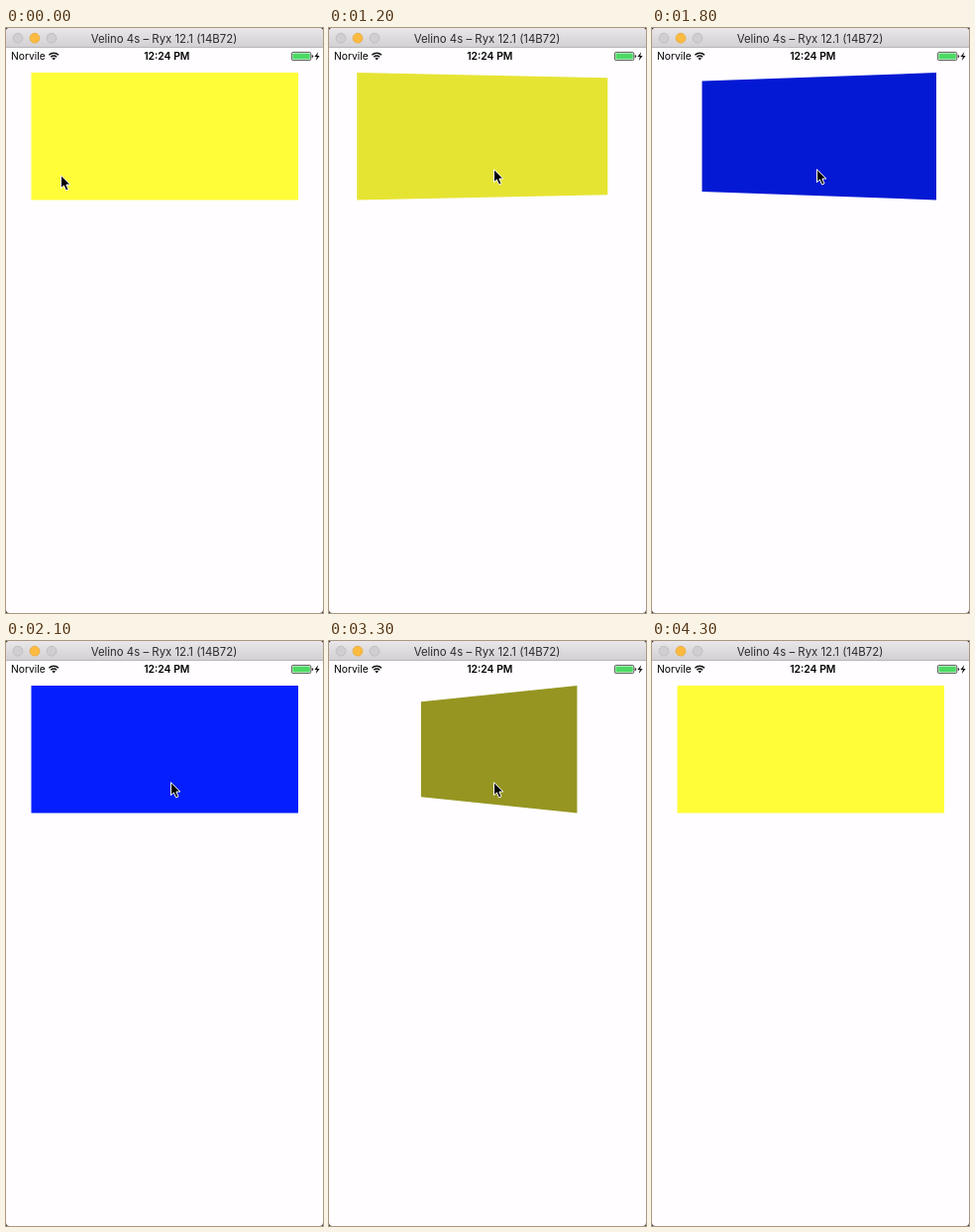
Animation of 320x590 px, one loop 4500 ms. Source, as an HTML page:

```html
<!DOCTYPE html>
<html lang="en">
<head>
<meta charset="utf-8">
<title>Card flip</title>
<style>
  html, body { margin: 0; width: 100%; height: 100%; overflow: hidden; background: #333; }
  svg { display: block; width: 320px; height: 590px; }
  text { font-family: Inter, Roboto, sans-serif; }
</style>
</head>
<body>
<svg viewBox="0 0 320 590">
  <defs>
    <linearGradient id="bar" x2="0" y2="1">
      <stop offset="0" stop-color="#e9e7e9"/>
      <stop offset="1" stop-color="#d1cfd1"/>
    </linearGradient>
    <clipPath id="window"><rect width="320" height="590" rx="3.5"/></clipPath>
  </defs>

  <g clip-path="url(#window)">
    <rect width="320" height="590" fill="#fffdff"/>
    <rect width="320" height="20" fill="url(#bar)"/>
    <rect y="19" width="320" height="1" fill="#b9b7b9"/>
    <g stroke-width=".8">
      <circle cx="12" cy="10.2" r="4.9" fill="#d0ced0" stroke="#bbb9bb"/>
      <circle cx="29" cy="10.2" r="4.9" fill="#fcbb40" stroke="#e8aa3c"/>
      <circle cx="46" cy="10.2" r="4.9" fill="#d0ced0" stroke="#bbb9bb"/>
    </g>
    <text x="159.5" y="14.5" font-size="11.4" text-anchor="middle" fill="#2c2b2c">Velino 4s – Ryx 12.1 (14B72)</text>

    <text x="5" y="32.2" font-size="10.3" fill="#000">Norvile</text>
    <g fill="none" stroke="#111" stroke-width="1.5">
      <path d="M43.4 27.2a6.8 6.8 0 0 1 9.6 0"/>
      <path d="M45.3 29.3a4.1 4.1 0 0 1 5.8 0"/>
    </g>
    <path d="M46.5 30.6a2.4 2.4 0 0 1 3.4 0l-1.7 1.8z" fill="#111"/>
    <text x="162.3" y="32.2" font-size="10.4" font-weight="600" text-anchor="middle" fill="#000">12:24 PM</text>
    <rect x="288.4" y="24.4" width="19.4" height="8.2" rx="1.5" fill="#fff" stroke="#333" stroke-width=".8"/>
    <rect x="289.4" y="25.4" width="17.4" height="6.2" rx=".7" fill="#4cd964"/>
    <path d="M308.7 27a1.5 1.5 0 0 1 0 3z" fill="#333"/>
    <path d="M315.2 24.3l-3.8 4.8h2.4l-1 3.8 3.8-4.9h-2.4z" fill="#111"/>

    <polygon id="card"/>
    <path id="cursor" d="M0 0V13L2.9 10.3 5.1 15.3 7.5 14.3 5.4 9.4H9.3Z"
          fill="#000" stroke="#fff" stroke-width="1" stroke-linejoin="round"/>
  </g>
</svg>
<script>
  const LOOP = 4500, TICK = 100, FLIP = 1015;
  const FLIP_OUT = 1020, FLIP_BACK = 2648;
  const YELLOW = [255, 253, 56], BLUE = [5, 30, 254];
  const CX = 160.25, CY = 109.25, HALF_W = 134.75, HALF_H = 64.25, DEPTH = 592;

  const card = document.getElementById('card');
  const cursor = document.getElementById('cursor');

  const clamp = v => Math.min(1, Math.max(0, v));
  const mix = (a, b, p) => a + (b - a) * p;
  const smooth = p => p * p * (3 - 2 * p);

  // cubic-bezier(.42, 0, .58, 1)
  function easeInOut(x) {
    let lo = 0, hi = 1;
    for (let i = 0; i < 24; i++) {
      const s = (lo + hi) / 2, r = 1 - s;
      if (1.26 * r * r * s + 1.74 * r * s * s + s * s * s < x) lo = s;
      else hi = s;
    }
    return smooth(lo);
  }

  // The near edge stays in the screen plane while the far edge recedes.
  function drawCard(t) {
    const back = t >= FLIP_BACK;
    const turn = easeInOut(clamp((t - (back ? FLIP_BACK : FLIP_OUT)) / FLIP));
    const angle = turn * Math.PI;
    const scale = DEPTH / (DEPTH + 2 * HALF_W * Math.sin(angle));
    const w = HALF_W * Math.cos(angle);
    const near = CX - w, far = CX + w * scale, h = HALF_H * scale;
    card.setAttribute('points',
      `${near},${CY - HALF_H} ${far},${CY - h} ${far},${CY + h} ${near},${CY + HALF_H}`);

    const face = (turn < 0.5) !== back ? YELLOW : BLUE;
    const light = 1 - 1.54 * Math.min(turn, 1 - turn);
    card.setAttribute('fill', `rgb(${face.map(c => Math.round(c * light))})`);
  }

  function drawCursor(t) {
    const enter = smooth(clamp(t / 600));
    const leave = smooth(clamp((t - 3800) / 500));
    const x = mix(mix(55.5, 166.5, enter), 212, leave);
    const y = mix(mix(148.6, 142.6, enter), -20, leave);
    cursor.setAttribute('transform', `translate(${x} ${y})`);
  }

  const start = performance.now();
  function draw(now) {
    const t = Math.floor((Math.max(0, now - start) % LOOP + 5) / TICK) * TICK % LOOP;
    drawCard(t);
    drawCursor(t);
    requestAnimationFrame(draw);
  }
  draw(start);
</script>
</body>
</html>
```
